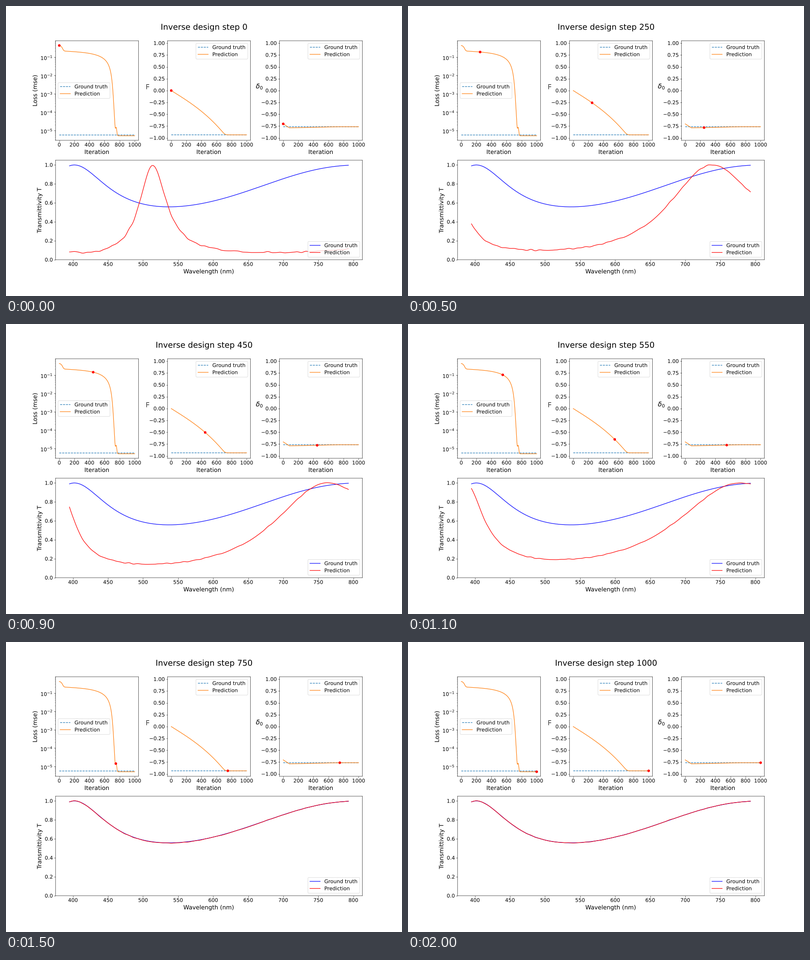
A matplotlib script for the animation above (2100 ms loop, 874 by 641 pixels).

```python
import numpy as np
import matplotlib.pyplot as plt
from matplotlib.animation import FuncAnimation
from matplotlib.patheffects import Normal

W, H, DPI = 874, 641, 874 / 15
STEP, FRAMES, INTERVAL = 50, 21, 100
TRUE_LOSS, TRUE_F, TRUE_DELTA = 5.6e-6, -0.934, -0.763

# Path effects draw the text as outlines, free of pixel rounding
plt.rcParams.update({"font.family": "DejaVu Sans", "font.size": 14,
                     "axes.labelsize": 16, "axes.labelpad": 5.5,
                     "path.snap": False, "path.effects": [Normal()]})

wl = np.arange(395, 794, 2)
steps = np.arange(1001)


def airy(f, d):
    """Transmittivity of an etalon from the two scaled design parameters."""
    phase = np.pi * (.011 + (799.6 + 3700 * (d - TRUE_DELTA)) / wl)
    return 1 / (1 + 12 * (1 + f) * np.sin(phase) ** 2)


# F speeds up towards its goal and settles there; delta drops in a straight
# line, then follows the remaining error of F
u = steps / 745
gap = -TRUE_F - .74 * u - .26 * u ** 3
gap = .02 * np.logaddexp(0, gap / .02)
finesse = TRUE_F + gap
delta = TRUE_DELTA - .0278 * gap + .086 * np.maximum(1 - steps / 80, 0)

# Loss: squared error of the spectrum, a small rebound and a floor
truth = airy(TRUE_F, TRUE_DELTA)
error = airy(finesse[:, None], delta[:, None]) - truth
loss = (error ** 2).mean(axis=1) + 5.1e-6
loss += 9e-6 * np.exp(-((steps - 754) / 10) ** 2)

# Fine ripple of the network's output
knots = np.arange(390, 801, 6)
ripple = np.interp(wl, knots, np.random.default_rng(4).normal(size=len(knots)))


def predict(step):
    f = finesse[step]
    return airy(f, delta[step]) + ripple * (.0015 + .0045 * (f - TRUE_F))


fig = plt.figure(figsize=((W + .01) / DPI, (H + .01) / DPI), dpi=DPI)
grid = fig.add_gridspec(2, 3, left=.125, right=.9, bottom=.125, top=.88,
                        wspace=.35, hspace=.2)
title = fig.suptitle("", fontsize=22, y=.94)


def history(col, goal, values, loc):
    ax = fig.add_subplot(grid[0, col])
    ax.plot([0, 1000], [goal, goal], "--", color="C0", label="Ground truth")
    ax.plot(steps, values, color="C1", label="Prediction")
    dot, = ax.plot([0], [values[0]], "ro")
    ax.set_xlim(-50, 1050)
    ax.set_xticks(range(0, 1001, 200))
    ax.set_xlabel("Iteration")
    ax.legend(loc=loc)
    return ax, dot, values


panels = [history(0, TRUE_LOSS, loss, "center left"),
          history(1, TRUE_F, finesse, "upper right"),
          history(2, TRUE_DELTA, delta, "upper right")]
panels[0][0].set_yscale("log")
panels[0][0].set_ylim(10 ** -5.542, 10 ** -.1176)
panels[0][0].set_ylabel("Loss (mse)")
for (ax, _, _), name in zip(panels[1:], ["F", r"$\delta_0$"]):
    ax.set_ylim(-1.05, 1.05)
    ax.set_yticks(np.arange(-1, 1.01, .25))
    ax.set_ylabel(name, rotation=0, fontsize=18, labelpad=4)

ax = fig.add_subplot(grid[1, :])
ax.plot(wl, truth, "b", label="Ground truth")
spectrum, = ax.plot(wl, predict(0), "r", label="Prediction")
ax.set_xlim(375.1, 812.9)
ax.set_ylim(0, 1.05)
ax.set_xticks(range(400, 801, 50))
ax.set_yticks(np.arange(0, 1.01, .2))
ax.set_xlabel("Wavelength (nm)")
ax.set_ylabel("Transmittivity T")
ax.legend(loc="lower right")


def update(frame):
    step = frame * STEP
    title.set_text(f"Inverse design step {step}")
    for _, dot, values in panels:
        dot.set_data([step], [values[step]])
    spectrum.set_ydata(predict(step))
    return [title, spectrum] + [p[1] for p in panels]


anim = FuncAnimation(fig, update, frames=FRAMES, interval=INTERVAL,
                     repeat=True, repeat_delay=0, blit=False)
plt.show()
```
